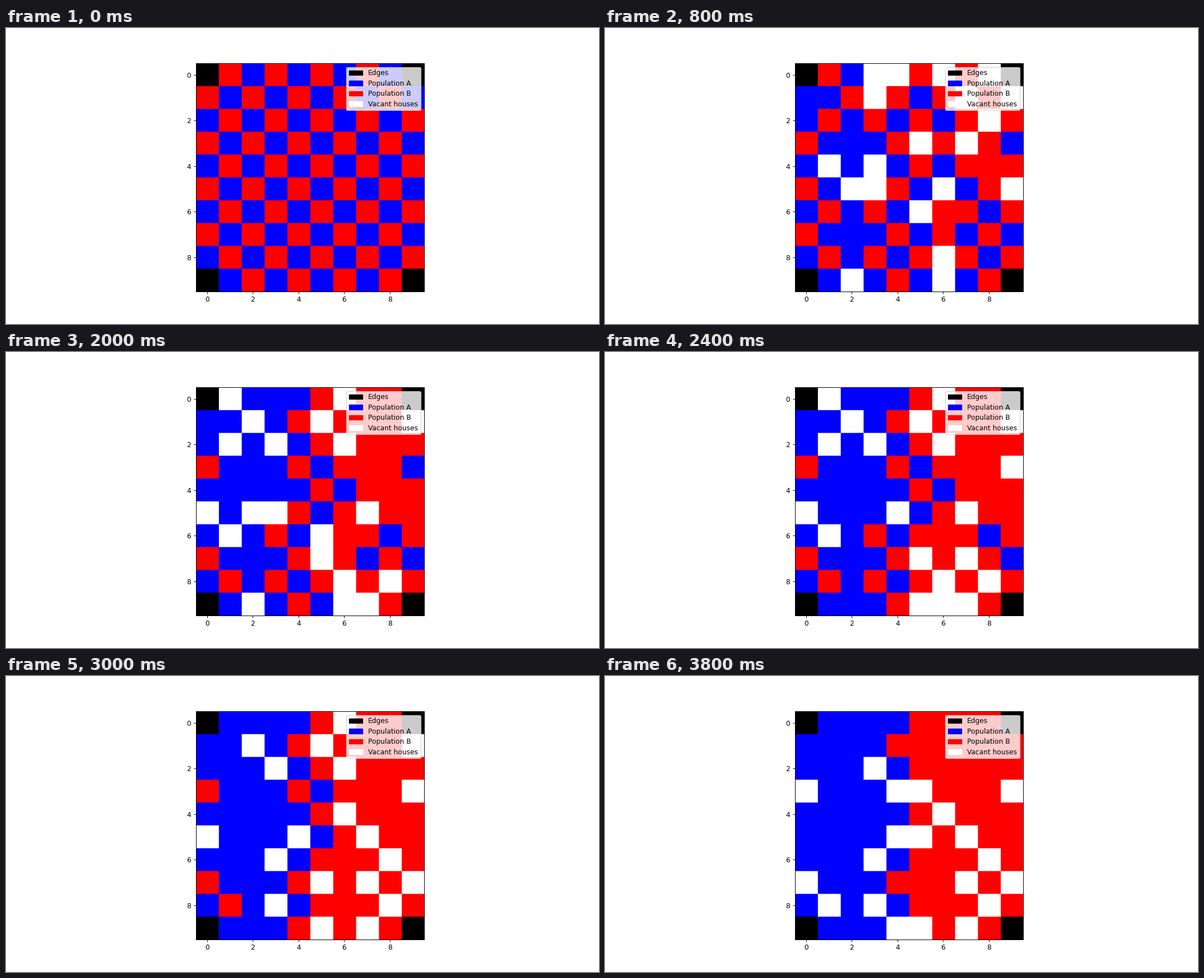
A matplotlib script that plays this animation: 1058 px wide and 529 px high, repeating every 4 s.

```python
import numpy as np
import matplotlib.pyplot as plt
from matplotlib.animation import FuncAnimation
from matplotlib.colors import to_rgb
from matplotlib.patches import Patch

SIZE = 10
STEPS = 20
CELL_PX = 46  # raster per cell, smoothed down to the stage
EDGE, A, B, VACANT = range(4)
COLORS = ["black", "blue", "red", "white"]
LABELS = ["Edges", "Population A", "Population B", "Vacant houses"]
PALETTE = np.array([to_rgb(c) for c in COLORS])

# A cell is numbered 10 * row + column.
OPEN_TO = {A: [10, 32, 3, 13, 4, 35, 41, 43, 52, 53, 92],
           B: [8, 17, 28, 37, 56, 59, 65, 86, 96]}
RESETTLED = [2, 11, 48, 66, 72]

# Misfits, A in the east and B in the west, in the order they leave.
LEAVERS = [19, 6, 75, 26, 15, 97, 61, 1, 88, 21, 50, 57, 12, 23, 95,
           77, 39, 54, 46, 83, 79, 68, 63, 70, 30, 81, 94, 55, 34, 35]


def checkerboard():
    rows, cols = np.indices((SIZE, SIZE))
    town = np.where((rows + cols) % 2, B, A)
    town[::SIZE - 1, ::SIZE - 1] = EDGE
    return town


def moves_done(step):
    """Two moves per step, with a slower stretch near the end."""
    return round(np.interp(step, [3, 14, 16, 19], [0, 22, 24, 30]))


def town_at(step):
    town = checkerboard()
    cells = town.ravel()
    if step >= 1:
        cells[OPEN_TO[A] + OPEN_TO[B] + RESETTLED] = VACANT
    if step >= 2:
        for cell in RESETTLED:
            cells[cell] = A if cell % SIZE < SIZE / 2 else B

    # Each leaver takes the house longest open to its group
    # and leaves its own to the other group.
    queues = {group: list(homes) for group, homes in OPEN_TO.items()}
    for cell in LEAVERS[:moves_done(step)]:
        group = cells[cell]
        cells[queues[group].pop(0)] = group
        cells[cell] = VACANT
        queues[A + B - group].append(cell)
    return town


def picture(step):
    pixels = np.kron(town_at(step), np.ones((CELL_PX, CELL_PX), int))
    return PALETTE[pixels]


fig, ax = plt.subplots(figsize=(12, 6), dpi=1058 / 12)
image = ax.imshow(picture(0), interpolation="hanning",
                  extent=(-0.5, SIZE - 0.5, SIZE - 0.5, -0.5))
ax.legend(handles=[Patch(color=c, label=t) for c, t in zip(COLORS, LABELS)],
          loc="upper right", labelspacing=0.447, borderpad=0.375)


def update(step):
    image.set_data(picture(step))
    return [image]


anim = FuncAnimation(fig, update, frames=STEPS, interval=200,
                     repeat=True, repeat_delay=0)
plt.show()
```
